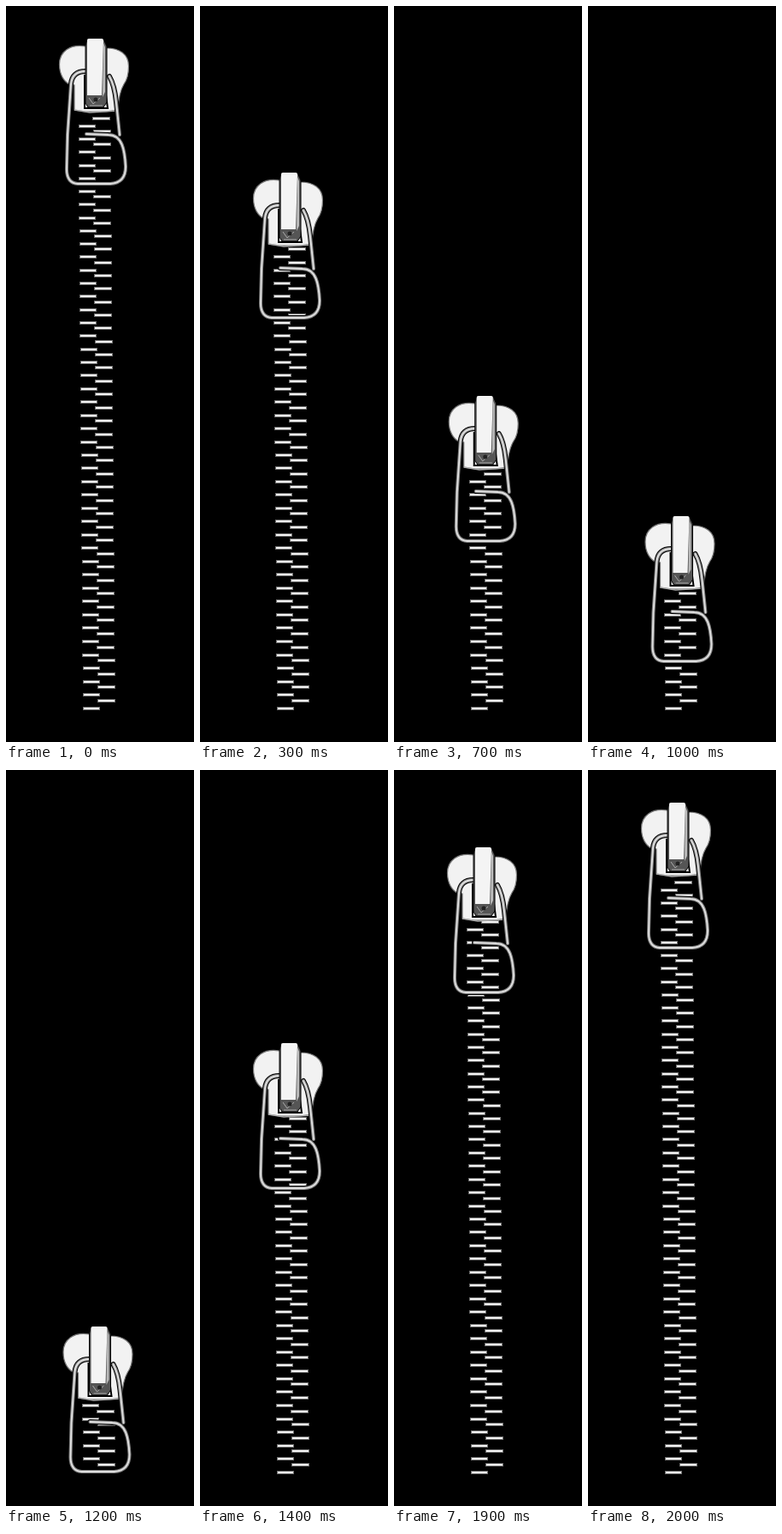
These frames come from a looping animation (220x857 px, 2.2 s). An HTML page:

```html
<!DOCTYPE html>
<html lang="en">
<head>
<meta charset="utf-8">
<title>Zipper</title>
<style>
html, body { margin: 0; width: 100%; height: 100%; overflow: hidden; background: #000; }
svg { display: block; }
</style>
</head>
<body>
<svg width="220" height="857" viewBox="0 0 220 857">
  <defs>
    <path id="wire" fill="none" stroke-linejoin="round" stroke-linecap="round"
      d="M93 76C83 76 77 81 76 91L72 150L71 190Q71 206 84 207H122Q140 206 140 187C139 168 136 150 120 150L94 149M121 82Q127 92 129 112L133 150"/>
  </defs>
  <g id="teeth"></g>
  <g id="slider">
    <!-- body -->
    <path fill="#f2f2f2" stroke="#777" stroke-width="1.200"
      d="M93 47C75 44 62.500 53 62.500 68C62.500 80 68 88 74 91L80 92V121L93 123H117L131 121Q132 101 138 91C143 84 143.500 77 143.500 70C143.500 56 133 49 117 49Z"/>
    <path fill="none" stroke="#000" stroke-width="2" d="M92 80V119H119L116 96"/>
    <path fill="none" stroke="#aaa" stroke-width="1.500" d="M80 121L98 124L130 122"/>
    <!-- pull -->
    <use href="#wire" stroke="#000" stroke-width="6"/>
    <use href="#wire" stroke="#808080" stroke-width="4"/>
    <use href="#wire" stroke="#e0e0e0" stroke-width="1.800"/>
    <!-- bridge -->
    <path fill="#555" stroke="#000" d="M93 46L95 38H114L118 47V112L114 118H96L93 113Z"/>
    <path fill="#f4f4f4" d="M95 40Q95 38 97 38H112Q114 38 114 41L112 104H95Z"/>
    <path fill="#bbb" d="M114 43L116 48V100L113 106Z"/>
    <path fill="none" stroke="#aaa" d="M97 107L102 114L110 107M98 116H113"/>
    <circle cx="105" cy="109" r="2.500" fill="#222"/>
  </g>
</svg>
<script>
const STEP = 100;
const down = [38, 90, 142, 194, 256, 318, 384, 454, 500, 547, 594, 621, 648];
const tops = [...down, 500, 318, 318, 256, 194, 142, 90, 38, 38];
const teethGroup = document.getElementById('teeth');
const slider = document.getElementById('slider');
const teeth = [];

function addBar(parent, x, y, width, height, fill) {
  const bar = document.createElementNS('http://www.w3.org/2000/svg', 'rect');
  const attrs = { x, y, width, height, fill };
  for (const key in attrs) bar.setAttribute(key, attrs[key]);
  parent.append(bar);
}

function addTooth(x, y, width) {
  const node = document.createElementNS('http://www.w3.org/2000/svg', 'g');
  const left = Math.round(x + (y - 135) * 0.008);
  const mid = Math.round(y);
  addBar(node, left, mid - 2, width, 4, '#707070');
  addBar(node, left + 1, mid - 1, width - 2, 2, '#f4f4f4');
  teethGroup.append(node);
  teeth.push({ node, y });
}

// Tooth spacing widens slightly toward the bottom.
for (let n = 0; n < 45; n++) {
  const offset = 15.2 * n + 0.0047 * n * n;
  addTooth(84.5, 140 + offset, 20);
  addTooth(101.5, 131 + offset, 21);
}

function draw(now) {
  const top = tops[Math.floor(now / STEP) % tops.length];
  const drift = Math.min(4.5, Math.max(0, (top - 384) * 0.025));
  slider.setAttribute('transform', `translate(${drift} ${top - 38})`);
  for (const { node, y } of teeth) {
    node.style.display = y > top + 86 ? '' : 'none';
  }
}

const start = performance.now();
function tick() {
  draw(performance.now() - start);
  requestAnimationFrame(tick);
}
tick();
</script>
</body>
</html>
```
